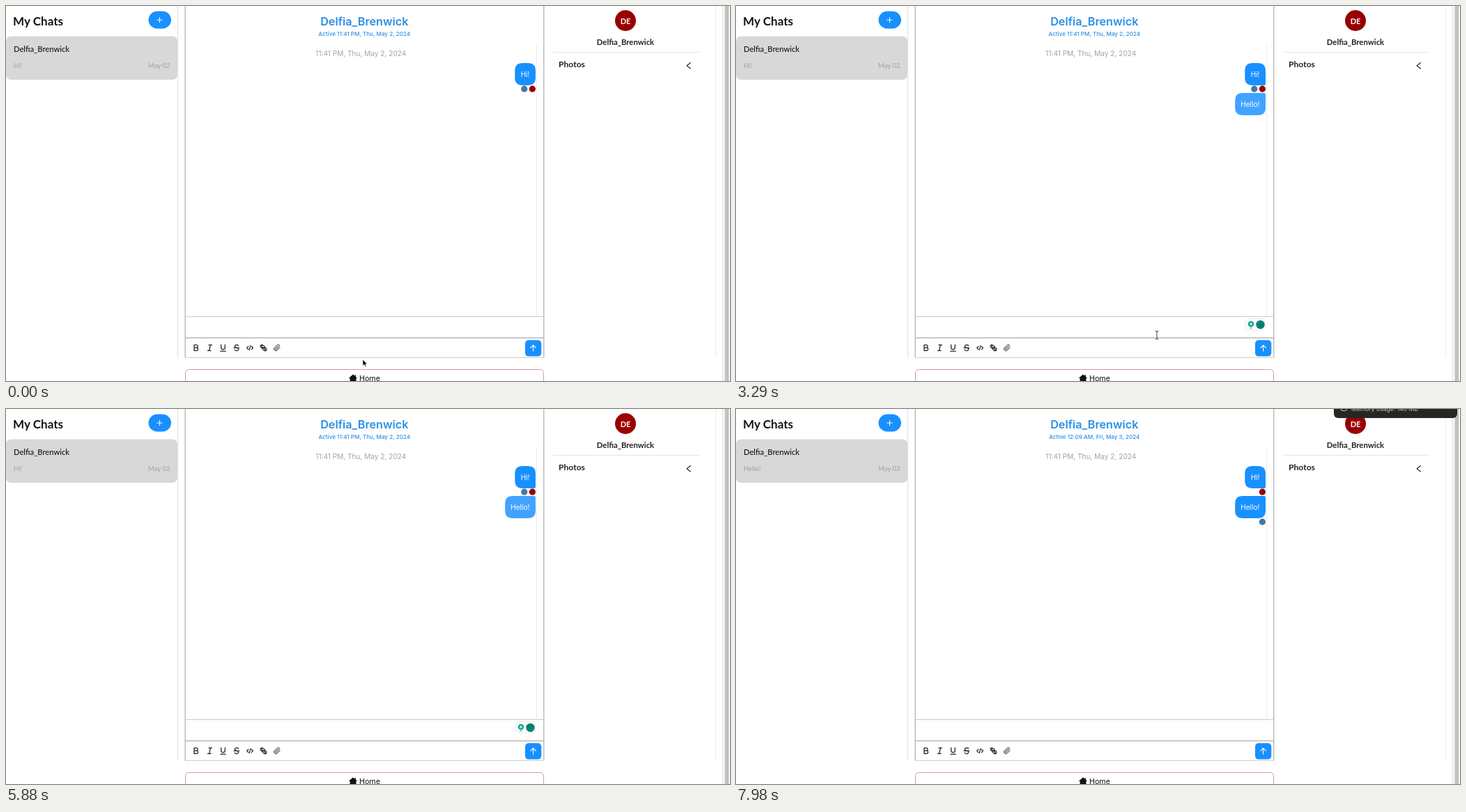
An HTML page that plays this animation: 1039x539 px, repeating every 8 s.

```html
<!DOCTYPE html>
<html lang="en">
<head>
<meta charset="utf-8">
<title>My Chats</title>
<style>
html, body { margin: 0; width: 100%; height: 100%; overflow: hidden; background: #fff; }
svg { display: block; width: 1039px; height: 539px; font-family: Inter, "Noto Sans", sans-serif; }
.lato { font-family: Lato, "Open Sans", sans-serif; }
.mid { text-anchor: middle; }
.line { fill: none; stroke-linecap: round; stroke-linejoin: round; }
.blue { fill: #1890ff; }
.accent { fill: #2b90e6; }
.muted { fill: #a3a3a3; }
</style>
</head>
<body>
<svg viewBox="0 0 1039 539" xmlns="http://www.w3.org/2000/svg">
  <rect width="1039" height="539" fill="#fff"/>

  <g id="page">
    <text class="lato" x="10" y="28" font-size="17.1" font-weight="700" fill="#151515">My Chats</text>
    <rect class="blue" x="204.5" y="7.5" width="32.5" height="25" rx="12.5"/>
    <path d="M216.5 20h8M220.5 16v8" stroke="#fff" stroke-width="1"/>

    <g id="contact" class="lato">
      <rect y="43.5" width="246" height="62.5" rx="7" fill="#d8d8d8"/>
      <text x="11" y="66" font-size="11.2" font-weight="500" fill="#151515">Delfia_Brenwick</text>
      <g font-size="9.5" fill="#a0a0a0">
        <text id="preview" x="11" y="89"></text>
        <text id="day" x="235.5" y="89" text-anchor="end"></text>
      </g>
    </g>
    <g id="skeleton" fill="#e1e1e1"></g>

    <g id="title" class="mid accent">
      <text x="514.3" y="27.5" font-size="16.2" font-weight="600">Delfia_Brenwick</text>
      <text id="active" x="514.3" y="43" font-size="8.1" font-weight="500"></text>
    </g>
    <g id="loader">
      <path id="spinner" class="line" d="M523 25A8 8 0 0 1 515 33" stroke="#2b90e6" stroke-width="1.4"/>
      <text class="mid accent" x="514.3" y="43" font-size="8" font-weight="500">Loading...</text>
    </g>

    <g id="profile" class="lato mid">
      <circle cx="889" cy="21" r="15" fill="#990000"/>
      <text x="889" y="25.5" font-size="11" font-weight="700" fill="#fff">DE</text>
      <text x="889" y="56" font-size="11.3" font-weight="700" fill="#222">Delfia_Brenwick</text>
      <path d="M785 66.5H995" stroke="#e4e4e4"/>
      <text x="812" y="87.5" font-size="12.1" font-weight="700" fill="#222">Photos</text>
      <path class="line" d="M982.5 81.5L977 85.7L982.5 90" stroke="#222" stroke-width="1.1"/>
    </g>

    <g fill="none">
      <path d="M246.5 0V505M1028.5 0V539" stroke="#dedede"/>
      <path d="M761.5 57V446M1018.5 0V505" stroke="#ebebeb"/>
      <path d="M257.2 0V505M771.8 0V505M257 477H772" stroke="#b9b9b9" stroke-width="1.4"/>
      <path d="M257 446.5H772M257 505.3H772" stroke="#cacaca"/>
      <rect x="257.5" y="522.5" width="514" height="40" rx="5" stroke="#d595a4"/>
    </g>
    <rect x="1029" width="10" height="539" fill="#fafafa"/>
    <rect x="1031.5" y="-4" width="5.8" height="547" fill="#c1c1c1"/>

    <g id="chat">
      <text class="mid muted" x="509.3" y="71.8" font-size="10.1">11:41 PM, Thu, May 2, 2024</text>
      <path id="hi" class="blue"/>
      <text class="mid" x="745" y="102.2" font-size="10" fill="#fff">Hi!</text>
      <g id="hello">
        <path id="helloBubble" class="blue"/>
        <text class="mid" x="737.8" y="145.2" font-size="10" fill="#fff">Hello!</text>
      </g>
      <circle id="seenBlue" r="4.6" fill="#4479a6"/>
      <circle cx="755.4" cy="119.2" r="4.6" fill="#990000"/>
    </g>

    <text id="draft" x="268" y="464.6" font-size="8.4" fill="#222"></text>
    <path id="caret" stroke="#111" stroke-width=".9"/>
    <g id="helper">
      <rect x="730.5" y="449.5" width="30" height="16.5" rx="8" fill="#fff" stroke="#e8e8e8"/>
      <circle cx="739" cy="457" r="4.3" fill="#15a88c"/>
      <path d="M737 462.8h4M739 455v4M737 457h4" stroke="#15a88c"/>
      <path d="M739 455v4M737 457h4" stroke="#fff"/>
      <circle cx="752.5" cy="458" r="6.2" fill="#027e6f"/>
      <path id="busy" class="line" d="M756.7 458A4.2 4.2 0 0 1 748.3 458" stroke="#249b8a" stroke-width=".9"/>
    </g>
    <circle id="dot" cx="755" cy="459.7" r="2.3" fill="#027e6f"/>

    <g class="line" stroke="#222" stroke-width="1.25">
      <path d="M270 487.2v8.2h3.5a2.1 2.1 0 0 0 0-4.2H270h3a2 2 0 0 0 0-4z"/>
      <path d="M291 487.2h4.5M289.5 495.4H294M293.4 487.2L291.6 495.4"/>
      <path d="M308.7 486.8v4a2.8 2.8 0 0 0 5.6 0v-4M307.8 496.2h7.4"/>
      <path d="M333.7 488.2c-1-1.5-5.3-1.5-5.3 .8 0 1 .7 1.5 1.6 1.9M327 491.3h7.6M332.6 491.6c2 1.6 .8 3.9-1.7 3.9-1.6 0-2.5-.6-3-1.5"/>
      <path d="M347.8 489.2L345.7 491.4L347.8 493.6M352.4 489.2L354.5 491.4L352.4 493.6M351 488.2L349.2 494.6"/>
      <path d="M369 491.5l-1.5-1.7a1.9 1.9 0 0 1 .2-2.6c-1.2-.7-2.7 .7-2.5 2 .2 1.3 2 3.3 3.6 3M367.5 487.3c1.7-.2 4 2 3.8 3.4M370 491.2l1.5 1.8a1.9 1.9 0 0 1-.2 2.6M370 490.6c1.8-.4 3.8 1.3 3.9 2.8 0 1.5-1.3 2.6-2.7 2.1-1.3-.5-3-2-2.8-3.3"/>
      <path stroke-width="1" d="M393 490.8l-3.9 4a2.6 2.6 0 0 1-3.7-3.7l4-4a1.75 1.75 0 0 1 2.5 2.5l-4 3.9a.85.85 0 0 1-1.2-1.2l3.6-3.6"/>
    </g>
    <rect class="blue" x="745" y="480.3" width="23.3" height="23.3" rx="5"/>
    <path class="line" d="M756.6 496v-8.4M752.8 491.3L756.6 487.5L760.4 491.3" stroke="#fff" stroke-width="1.1"/>

    <path d="M498 529.4L491.8 535H493.6V540H502.5V535H504.2L502 533V530.2H500.6V531.7Z" fill="#111"/>
    <text x="507" y="539.2" font-size="10.7" fill="#111">Home</text>

    <g id="card">
      <rect x="858" y="-20" width="177" height="33" rx="6" fill="#262626"/>
      <rect x="868.5" y="-5" width="7.5" height="7.5" rx="1.5" fill="none" stroke="#c4c4c4"/>
      <text x="883" y="2.6" font-size="8.6" fill="#c4c4c4">Memory usage: 140 MB</text>
    </g>
  </g>

  <text id="blank" x="0" y="9" font-size="10.3" fill="#222">Loading ...</text>

  <g id="pointer">
    <path id="arrow" d="M0 0V9.3L2.1 7.4L3.7 10.6L5.1 9.9L3.6 6.8H6.4Z" fill="#000" stroke="#fff" stroke-width=".7"/>
    <path id="beam" class="line" d="M-2-6Q0-6 0-4.5Q0-6 2-6M0-4.5V4.5M-2 6Q0 6 0 4.5Q0 6 2 6" stroke="#333" stroke-width=".9"/>
  </g>
</svg>

<script>
const LOOP = 8000, STEP = 70;
const SENT = 2870, RELOAD = 6650, SKELETON = 7140, LOADED = 7630, MESSAGES = 7980;

const el = {};
document.querySelectorAll('[id]').forEach(node => el[node.id] = node);

const show = (node, on) => node.setAttribute('visibility', on ? 'inherit' : 'hidden');
const set = (node, name, value) => node.setAttribute(name, value);
const spin = (node, degrees, x, y) => set(node, 'transform', `rotate(${degrees} ${x} ${y})`);
const ramp = (t, from, to) => Math.min(1, Math.max(0, (t - from) / (to - from)));

// [time, text]
const typing = [[1260, 'H'], [1540, 'He'], [1820, 'Hel'], [1960, 'Hell'], [2170, 'Hello'], [2450, 'Hello!']];

// Pointer strokes: [time, x, y]
const strokes = [
  [[0, 512, 508], [70, 512, 504], [350, 510, 459], [559, 510, 459]],
  [[3150, 510, 459], [3500, 745, 494], [3640, 788, 490], [3780, 806, 450], [4130, 809, 339],
   [4270, 812, 240], [4480, 690, 78], [4830, 519, 9]]
];

function bubble(x, y, topRight, bottomRight) {
  const right = 760, bottom = y + 32, r = 11;
  return `M${x + r} ${y}H${right - topRight}Q${right} ${y} ${right} ${y + topRight}` +
    `V${bottom - bottomRight}Q${right} ${bottom} ${right - bottomRight} ${bottom}` +
    `H${x + r}Q${x} ${bottom} ${x} ${bottom - r}V${y + r}Q${x} ${y} ${x + r} ${y}Z`;
}

function buildSkeleton() {
  const bar = (x, y, w, h) => `<rect x="${x}" y="${y}" width="${w}" height="${h}" rx="3"/>`;
  let bars = bar(249, -4, 6, 246.5).replace('/>', ' fill="#c1c1c1"/>');
  for (let row = 0; row < 8; row++) {
    const y = 54.4 + row * 62.55;
    bars += bar(11, y, 224.5, 11);
    if (row < 7) bars += bar(11, y + 26, 76, 8.6) + bar(190, y + 28, 45.5, 8.6);
  }
  el.skeleton.innerHTML = bars;
}

function drawPointer(t) {
  const path = strokes.find(p => t >= p[0][0] && t <= p[p.length - 1][0]);
  show(el.pointer, path);
  if (!path) return;
  const i = Math.max(1, path.findIndex(p => p[0] >= t));
  const [a, b] = [path[i - 1], path[i]];
  const k = ramp(t, a[0], b[0]);
  const x = a[1] + (b[1] - a[1]) * k, y = a[2] + (b[2] - a[2]) * k;
  const overInput = x > 257 && x < 772 && y > 447 && y < 477;
  set(el.pointer, 'transform', `translate(${x} ${y})`);
  show(el.arrow, !overInput);
  show(el.beam, overInput);
}

function drawInput(t) {
  const editing = t >= 700 && t < SENT;
  const typed = typing.filter(([start]) => start <= t).pop();
  el.draft.textContent = editing && typed ? typed[1] : '';
  show(el.caret, editing);
  const x = 268.5 + (el.draft.textContent ? el.draft.getComputedTextLength() : 0);
  set(el.caret, 'd', `M${x} 456.3V466.6`);

  const helperIn = t < SENT ? ramp(t, 630, 1050) * (1 - ramp(t, 1190, 1400)) : ramp(t, 2800, 3080);
  show(el.helper, helperIn > 0 && t < RELOAD);
  set(el.helper, 'opacity', helperIn);
  spin(el.busy, (t - 5880) * 0.36, 752.5, 458);
  show(el.dot, t >= 1330 && t < SENT);
}

function drawChat(t) {
  const sent = t >= SENT, delivered = t >= MESSAGES;
  show(el.chat, t < RELOAD || delivered);
  show(el.hello, sent);
  set(el.hello, 'opacity', delivered ? 1 : 0.82);
  set(el.hi, 'd', bubble(730.3, 82, 11, sent ? 2 : 11));
  set(el.seenBlue, 'cx', delivered ? 755.4 : 743.8);
  set(el.seenBlue, 'cy', delivered ? 162.2 : 119.2);
}

function draw(t) {
  const blank = t >= RELOAD && t < SKELETON;
  const loading = t >= SKELETON && t < LOADED;
  const fresh = t >= LOADED;
  show(el.page, !blank);
  show(el.blank, blank);
  if (blank) el.page.style.display = 'none';
  else el.page.style.display = '';
  [el.contact, el.title, el.profile].forEach(node => show(node, !loading));
  [el.skeleton, el.loader].forEach(node => show(node, loading));
  show(el.card, t >= 7280);
  el.preview.textContent = fresh ? 'Hello!' : 'Hi!';
  el.day.textContent = fresh ? 'May 03' : 'May 02';
  el.active.textContent = fresh ? 'Active 12:09 AM, Fri, May 3, 2024' : 'Active 11:41 PM, Thu, May 2, 2024';
  spin(el.spinner, 72 + (t - 7560) * 0.36, 515, 25);
  if (!blank) {
    drawChat(t);
    drawInput(t);
  }
  drawPointer(t);
}

buildSkeleton();
set(el.helloBubble, 'd', bubble(716.2, 125, 2, 11));

const start = performance.now();
function tick() {
  const t = (performance.now() - start) % LOOP;
  draw(Math.floor(t / STEP) * STEP);
  requestAnimationFrame(tick);
}
tick();
</script>
</body>
</html>
```
